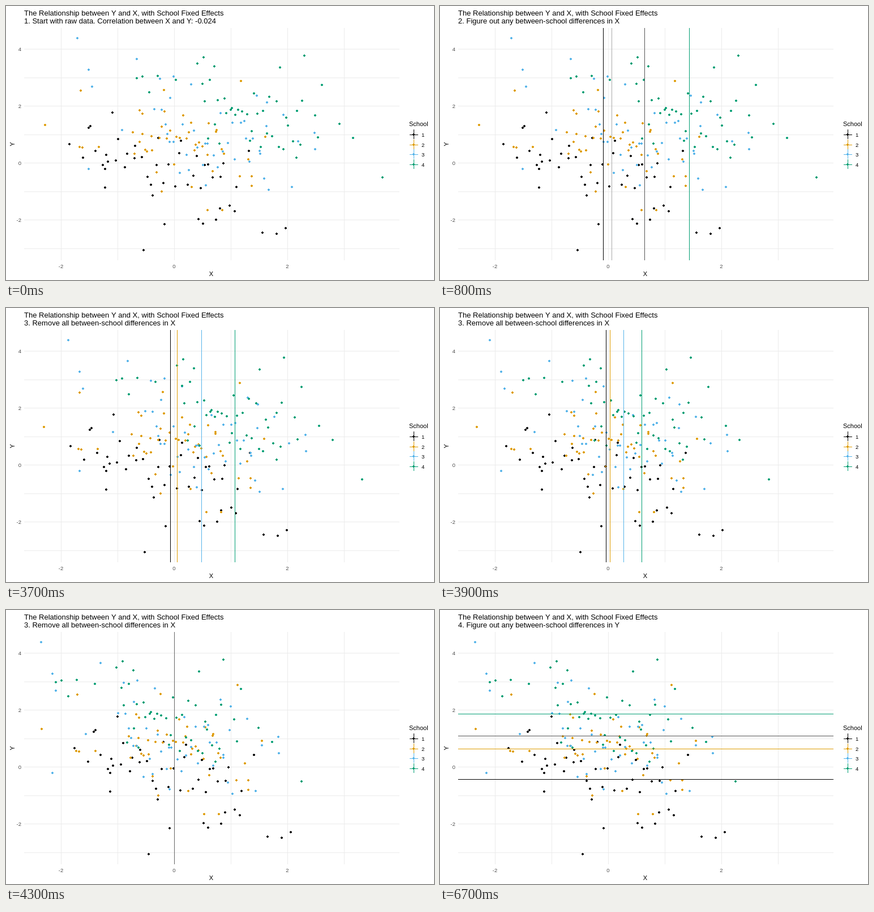
An HTML page with a canvas for the animation above (8 s loop, 756x486 px).

```html
<!DOCTYPE html>
<html lang="en">
<head>
<meta charset="utf-8">
<title>School Fixed Effects</title>
<style>
html, body { margin: 0; width: 100%; height: 100%; overflow: hidden; background: #fff; }
canvas { display: block; }
</style>
</head>
<body>
<canvas id="stage" width="756" height="486"></canvas>
<script>
const ctx = document.getElementById('stage').getContext('2d');
const LOOP = 8000, ZERO = 297;
const LEFT = 32, RIGHT = 695, TOP = 39, BOTTOM = 451;

// edge: x, y pairs of the outer points
// core: count, centre x, half width, centre y, slope, half height of the dense middle
const schools = [
  { color: '#000', meanX: 288, meanY: 300, core: [31, 272, 125, 277, .33, 60],
    edge: [112,245, 188,189, 146,216, 136,269, 175,289, 175,322, 243,433, 280,387, 259,336, 340,378,
           348,386, 371,379, 378,359, 404,364, 453,402, 478,404, 494,394, 429,257, 407,321] },
  { color: '#de9b00', meanX: 303.4, meanY: 246, core: [32, 304, 83, 240, .1, 70],
    edge: [69,211, 132,150, 130,250, 135,251, 164,250, 279,149, 415,133, 458,232, 428,272,
           413,302, 434,302, 434,319, 356,362, 382,362, 275,329, 236,185, 241,191, 328,321] },
  { color: '#56b4e9', meanX: 361.45, meanY: 223, core: [30, 362, 100, 238, .2, 75],
    edge: [126,57, 146,113, 152,143, 146,289, 231,94, 272,129, 296,125, 290,163, 327,139, 205,220,
           443,159, 461,171, 490,193, 545,225, 546,254, 516,240, 505,321, 464,326, 456,306, 353,318] },
  { color: '#009e73', meanX: 440, meanY: 184, core: [32, 437, 88, 200, .25, 70],
    edge: [527,88, 558,140, 484,109, 349,91, 338,102, 368,107, 268,124, 231,128, 241,125,
           253,153, 300,131, 347,138, 589,209, 613,234, 665,304, 546,194, 551,233, 523,168] }
];

const captions = [
  [0, '1. Start with raw data. Correlation between X and Y: -0.024'],
  [500, '2. Figure out any between-school differences in X'],
  [3500, '3. Remove all between-school differences in X'],
  [6400, '4. Figure out any between-school differences in Y']
];

let seed = 20;
function random() {
  seed = (seed * 1664525 + 1013904223) % 4294967296;
  return seed / 4294967296;
}

for (const s of schools) {
  s.points = [];
  for (let i = 0; i < s.edge.length; i += 2) s.points.push([s.edge[i], s.edge[i + 1]]);
  const [count, cx, w, cy, slope, h] = s.core;
  for (let i = 0; i < count; i++) {
    const dx = w * (2 * (i + random()) / count - 1);
    s.points.push([cx + dx, cy + slope * dx + h * (random() + random() - 1)]);
  }
}

function rect(x, y, w, h, color) {
  ctx.fillStyle = color;
  ctx.fillRect(x, y, w, h);
}

function vline(x, color) { rect(Math.round(x), TOP, 1, BOTTOM - TOP, color); }
function hline(y, color) { rect(LEFT, Math.floor(y), RIGHT - LEFT, 1, color); }

function dot(x, y, color) {
  x = Math.round(x);
  y = Math.round(y);
  rect(x - 2, y - 1, 4, 2, color);
  rect(x - 1, y - 2, 2, 4, color);
}

function text(str, x, y, size, color = '#000', align = 'left') {
  ctx.font = size + 'px "Liberation Sans", Arial, sans-serif';
  ctx.fillStyle = color;
  ctx.textAlign = align;
  ctx.fillText(str, x, y);
}

function drawAxes() {
  for (let x = 97; x < 600; x += 100) vline(x, '#ebebeb');
  for (let y = 76.5; y < 440; y += 50.5) hline(y, '#ebebeb');
  for (const v of [-2, 0, 2]) text(v, ZERO + 100 * v, 465, 9.5, '#4d4d4d', 'center');
  for (const v of [-2, 0, 2, 4]) text(v, 27, 282 - 50.5 * v, 9.5, '#4d4d4d', 'right');
  text('X', 362.5, 479, 11, '#000', 'center');
  ctx.save();
  ctx.translate(15, 245);
  ctx.rotate(-Math.PI / 2);
  text('Y', 0, 0, 11, '#000', 'center');
  ctx.restore();
}

function drawLegend() {
  text('School', 712, 213, 11);
  schools.forEach((s, i) => {
    const y = Math.round(228 + 17.5 * i);
    rect(720, y - 9, 1, 17, s.color);
    rect(713, y, 15, 1, s.color);
    dot(720, y, s.color);
    text(i + 1, 734, y + 4, 9.5);
  });
}

function meanColor(i, t) {
  if (t >= 4300) return '#666';
  if (i === 1 && t < 3600) return '#aaa';
  if (i === 2 && t < 3500) return '#555';
  return schools[i].color;
}

function draw(t) {
  rect(0, 0, 756, 486, '#fff');
  drawAxes();
  drawLegend();
  text('The Relationship between Y and X, with School Fixed Effects', 32, 17, 13);
  text(captions.filter(c => t >= c[0]).pop()[1], 32, 31, 13);

  // nine sine-eased steps bring every school mean to zero
  const step = Math.min(9, Math.max(0, Math.floor((t - 3400) / 100)));
  const ease = (1 - Math.cos(Math.PI * step / 9)) / 2;
  const shift = s => (ZERO - s.meanX) * ease;

  for (const s of schools)
    for (const [x, y] of s.points) dot(x + shift(s), y, s.color);

  schools.forEach((s, i) => {
    if (t >= 800 && t < 6400) vline(s.meanX + shift(s), meanColor(i, t));
    if (t >= 6700) hline(s.meanY, i === 2 ? '#555' : s.color);
  });
}

const start = performance.now();
function tick() {
  draw((performance.now() - start) % LOOP);
  requestAnimationFrame(tick);
}
tick();
</script>
</body>
</html>
```
